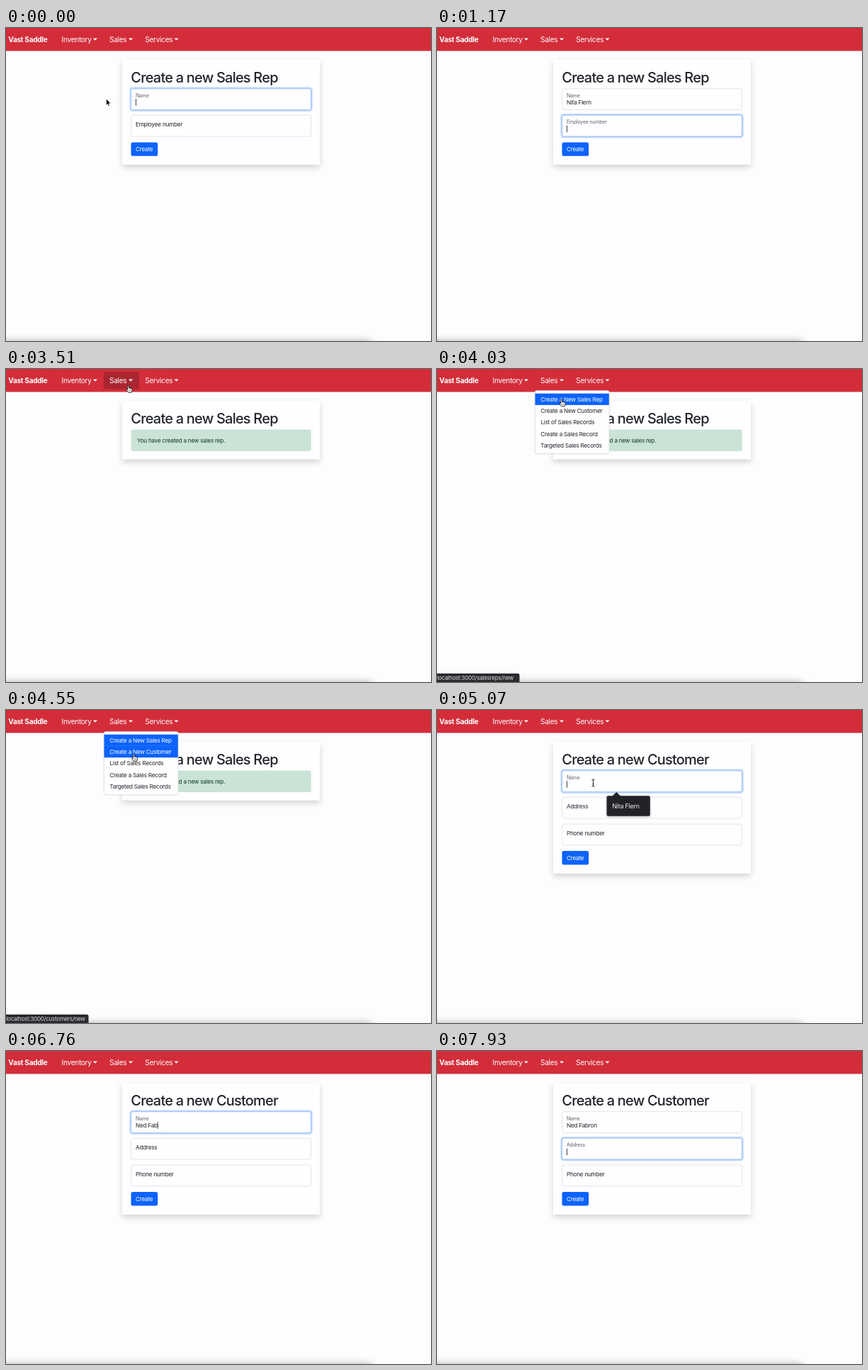
Write an HTML page that moves like this. It is 600 px wide and 442 px high and loops after 8000 ms.

```html
<!DOCTYPE html>
<html lang="en">
<head>
<meta charset="utf-8">
<style>
html, body { margin: 0; width: 100%; height: 100%; overflow: hidden; background: #fdfcfe; }
svg { position: absolute; left: 0; top: 0; }
text { font: 8.2px Inter, "Liberation Sans", sans-serif; font-optical-sizing: none; letter-spacing: -.03em; fill: #212529; white-space: pre; }
.nav { font-size: 10.1px; fill: #fff; }
.brand { font-weight: 700; }
.title { font-size: 20px; font-weight: 500; letter-spacing: -.04em; }
.small { font-size: 7px; fill: #61656b; }
.light { fill: #fff; }
.card { fill: #fefdff; filter: drop-shadow(0 4px 4px rgba(0,0,0,.16)); }
</style>
</head>
<body>
<svg id="stage" width="600" height="442" viewBox="0 0 600 442"></svg>
<script>
const LOOP = 8000, STEP = 130;
const REP = 'Nita Flern', CUSTOMER = 'Ned Fabron', NUMBER = '10245';
const SENT = 2600, MENU_OPEN = 3770, PRESS = 4550, NEW_PAGE = 4680;
const NAME_FOCUS = 4940, POPUP = 5070, TYPE_CUSTOMER = 5980, ADDRESS_FOCUS = 7280;
const MENU = ['Create a New Sales Rep', 'Create a New Customer', 'List of Sales Records',
  'Create a Sales Record', 'Targeted Sales Records'];

// time, x, y, pointer shape from that time on
const PATH = [
  [0, 141.5, 100, 'arrow'], [2200, 141.5, 100, 'arrow'], [2470, 197, 170, 'hand'],
  [2600, 197, 170, 'arrow'], [2860, 285, 106, 'arrow'], [3250, 195, 60, 'arrow'],
  [3380, 172.5, 23, 'hand'], [3770, 172.5, 23, 'hand'], [3900, 174, 40, 'hand'],
  [4160, 177, 45, 'hand'], [4420, 180, 62, 'hand'], [4680, 180, 62, 'arrow'],
  [4940, 220.5, 103, 'beam'], [LOOP, 220.5, 103, 'beam']
];
const SHAPES = {
  arrow: '<path d="M0 0V9.2L2.1 7.3L3.5 10.4L5 9.7L3.6 6.7H6.6Z" fill="#000" stroke="#fff" stroke-width=".7"/>',
  hand: '<path d="M-.7 .6Q.3 -.5 1.2 .6V4L3.3 4.2L5.3 5Q6 5.4 5.7 7L4.8 10.2H.2L-2.6 6.4Q-2.6 5 -.7 6.2Z" fill="#fff" stroke="#000" stroke-width=".8"/><path d="M1.4 6V8.6M3.2 6V8.6" stroke="#000" stroke-width=".5"/>',
  beam: '<path d="M-2 -5Q0 -5 0 -3.8Q0 -5 2 -5M0 -4V4M-2 5Q0 5 0 3.8Q0 5 2 5M-1 1.5H1" fill="none" stroke="#111" stroke-width=".9"/>'
};

const stage = document.getElementById('stage');
const text = (x, y, s, cls = '') => `<text x="${x}" y="${y}" class="${cls}">${s}</text>`;
const rect = (x, y, w, h, fill, r = 0, more = '') =>
  `<rect x="${x}" y="${y}" width="${w}" height="${h}" rx="${r}" fill="${fill}" ${more}/>`;
const typed = (s, t, start, gap) => s.slice(0, Math.max(0, Math.floor((t - start) / gap) + 1));

function field(y, label, value, focused, caretOn) {
  let s = '';
  if (focused) s += rect(175.6, y - .9, 256, 32, 'none', 3.4, 'stroke="#bed7fc" stroke-width="2.2"');
  s += rect(176.7, y + .2, 253.8, 29.8, '#fefdff', 2.6,
    `stroke="${focused ? '#8fb9f8' : '#dee0e5'}" stroke-width=".8"`);
  if (!focused && !value) return s + text(183, y + 16, label);
  s += text(183, y + 12.2, label, 'small');
  s += `<text x="183" y="${y + 22.4}" ${focused ? 'id="active"' : ''}>${value}</text>`;
  if (focused && caretOn) s += rect(183, y + 14.6, .8, 9.6, '#111', 0, 'id="caret"');
  return s;
}

const button = y => rect(176.5, y, 37.7, 19.4, '#0d63fb', 2.6) + text(183, y + 12.7, 'Create', 'light');

function navbar(hover) {
  let s = rect(0, 0, 600, 32.4, '#d32d3a');
  if (hover) s += rect(137.7, 4, 50.3, 24.6, '#a92630', 2.6);
  s += text(3.3, 20.3, 'Vast Saddle', 'nav brand');
  [['Inventory', 78.6, 122.8], ['Sales', 146, 173], ['Services', 196.3, 237.4]].forEach(([name, x, arrow]) => {
    s += text(x, 20.3, name, 'nav') + `<path d="M${arrow} 14.4h6.2l-3.1 3.2z" fill="#fff"/>`;
  });
  return s;
}

function page(t) {
  const isRep = t < NEW_PAGE, sent = isRep && t >= SENT;
  const bottom = sent ? 127.6 : isRep ? 193 : 231;
  let s = rect(164, 45, 279, bottom - 45, '#fefdff', 0, 'class="card"');
  s += text(176.3, 76.8, 'Create a new ' + (isRep ? 'Sales Rep' : 'Customer'), 'title');
  if (sent) {
    return s + rect(176.5, 85.5, 254.3, 30.4, '#cae3d6', 2.6) +
      `<text x="185" y="103.6" style="fill:#0f3726">You have created a new sales rep.</text>`;
  }
  if (isRep) {
    const onNumber = t >= 1105;
    return s + field(85.5, 'Name', typed(REP, t, 180, 82), !onNumber, true) +
      field(123, 'Employee number', typed(NUMBER, t, 1430, 130), onNumber, true) + button(161.4);
  }
  const onAddress = t >= ADDRESS_FOCUS;
  const nameCaret = t < 5500 || t >= TYPE_CUSTOMER;
  return s +
    field(85.5, 'Name', typed(CUSTOMER, t, TYPE_CUSTOMER, 120), t >= NAME_FOCUS && !onAddress, nameCaret) +
    field(123, 'Address', '', onAddress, t < 7500 || t > 7900) +
    field(160.8, 'Phone number', '', false) + button(199);
}

function menu(t, y) {
  const over = Math.floor((y - 34.6) / 16.25);
  let s = rect(138.2, 30.4, 105, 89.4, '#fefdff', 2.6, 'stroke="#cfd0d4" stroke-width=".7"');
  MENU.forEach((label, i) => {
    const top = 34.6 + i * 16.25;
    const blue = i === 0 || (i === over && t >= PRESS);
    if (blue || i === over) s += rect(138.5, top, 104.3, 16.3, blue ? '#0d63fb' : '#f5f6f8');
    s += text(146.3, top + 11.2, label, blue ? 'light' : '');
  });
  return s;
}

const popup = () =>
  '<g style="filter:drop-shadow(0 1px 1.5px rgba(0,0,0,.3))"><path d="M247 122L253.3 116L259.6 122z" fill="#222326"/>' +
  rect(239.6, 121.3, 61.2, 28.4, '#222326', 2) + '</g>' +
  `<text x="247.3" y="138.6" style="font-size:9px;fill:#eee">${REP}</text>`;

const status = route => rect(-4, 430, 120.5, 16, '#2b2a2e', 2.5) +
  `<text x="0.4" y="439.4" style="font-size:8px;fill:#dcdbde">localhost:3000/${route}/new</text>`;

const edgeShadow = '<defs><filter id="soft" x="-20%" y="-200%" width="140%" height="500%">' +
  '<feGaussianBlur stdDeviation="6"/></filter></defs>' +
  rect(-60, 443, 578, 40, '#000', 8, 'opacity=".38" filter="url(#soft)"');

function pointer(t) {
  const i = PATH.findIndex((p, k) => t >= p[0] && t < PATH[k + 1][0]);
  const [t0, x0, y0, shape] = PATH[i], [t1, x1, y1] = PATH[i + 1];
  const u = (t - t0) / (t1 - t0), e = u * u * (3 - 2 * u);
  return { x: x0 + (x1 - x0) * e, y: y0 + (y1 - y0) * e, shape };
}

function draw(t) {
  const p = pointer(t);
  const menuOpen = t >= MENU_OPEN && t < NEW_PAGE;
  const overSales = p.shape === 'hand' && p.y < 29;
  let s = page(t) + navbar(overSales) + edgeShadow;
  if (menuOpen) s += menu(t, p.y);
  if (t >= POPUP && t < TYPE_CUSTOMER) s += popup();
  if (t >= 4030 && t < 4810) s += status(p.y < 50.8 ? 'salesreps' : 'customers');
  if (t < STEP || (t >= 2200 && t < TYPE_CUSTOMER)) {
    s += `<g transform="translate(${p.x} ${p.y})">${SHAPES[p.shape]}</g>`;
  }
  stage.innerHTML = s;
  const caret = document.getElementById('caret');
  if (caret) caret.setAttribute('x', 183 + document.getElementById('active').getComputedTextLength());
}

let last = -1;
function tick() {
  const t = Math.floor(performance.now() % LOOP / STEP) * STEP;
  if (t !== last) draw(last = t);
  requestAnimationFrame(tick);
}
tick();
</script>
</body>
</html>
```
